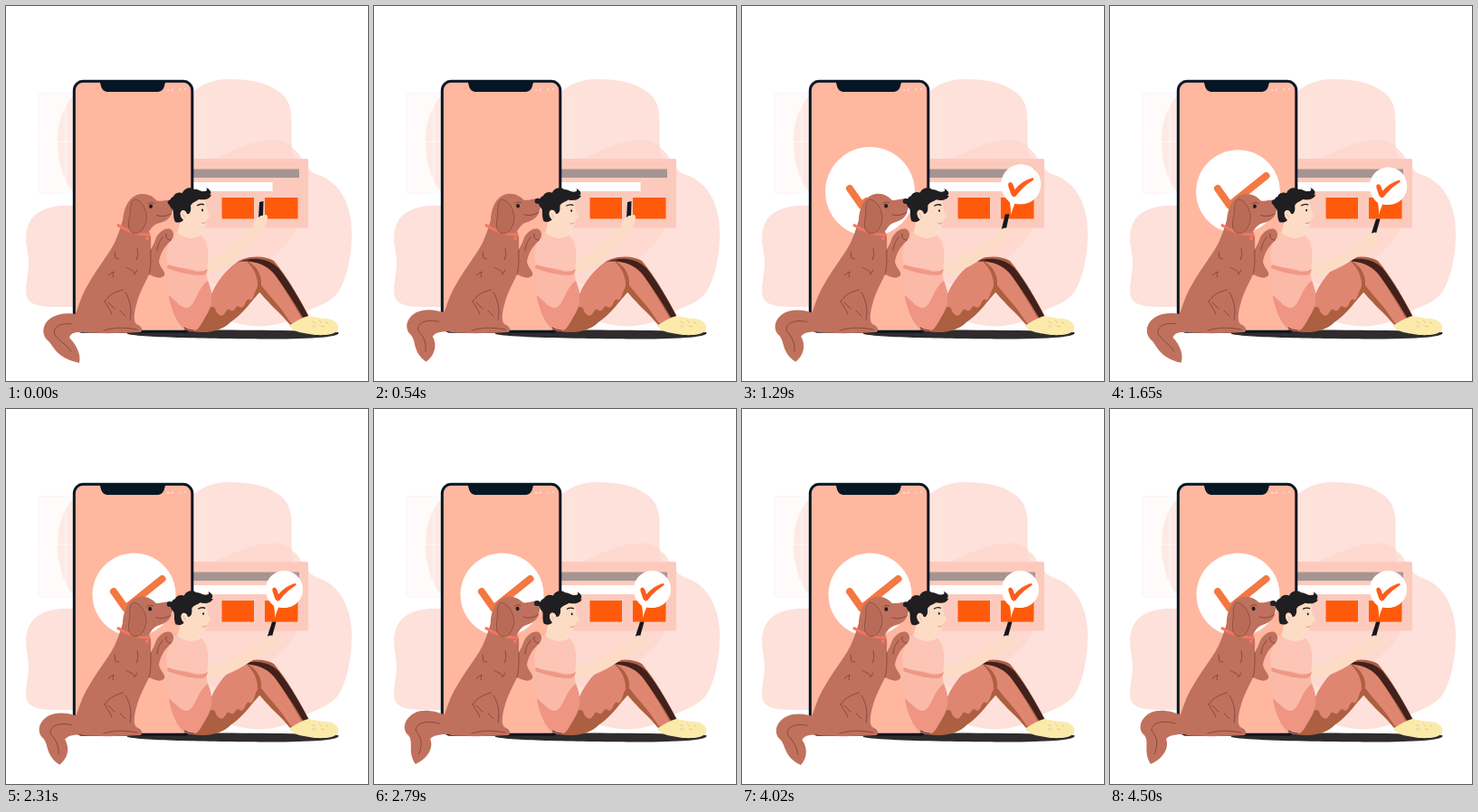
An HTML page that plays this animation: 400 by 415 pixels, repeating every 4530 ms.

```html
<!DOCTYPE html>
<html lang="en">
<head>
<meta charset="utf-8">
<title>Payment confirmed</title>
<style>
  html, body { margin: 0; width: 100%; height: 100%; overflow: hidden; background: #fff; }
  svg { display: block; width: 100vw; height: 100vh; }
  .line { fill: none; stroke: #7d3f33; stroke-width: .8; stroke-linecap: round; }
  .fur { fill: #bf715d; }
  .skin { fill: #fddcc6; }
  .hair { fill: #1f1e20; }
  .tick { fill: none; stroke-linecap: round; stroke-linejoin: round; }
</style>
</head>
<body>
<svg viewBox="0 0 400 415" preserveAspectRatio="none">
  <g id="backdrop">
    <rect x="36" y="96.500" width="188" height="111.500" rx="3" fill="#fefbfa" stroke="#f9f3f1" stroke-width=".7"/>
    <path d="M76 98C63 110 56 130 57 154C58 178 66 198 76 207Z" fill="#fdeae4"/>
    <path d="M36 150H76M66 97V208" stroke="#fff" stroke-width=".8"/>
    <path d="M204 97C216 87 228 81 246 81C272 81 288 85 302 95C314 104 316 116 315.500 132C315 158 316 175 330 210L204 240Z" fill="#fde1da"/>
    <path d="M76 221C50 219 30 226 24 244C19 260 25 270 25 285C25 298 20 312 23 322C28 334 44 333 76 333L150 345L205 215C225 195 242 165 268 154C290 145 311 149 323 163C330 174 333 183 345 187C370 195 382 222 382 250C382 276 378 294 370 312C360 330 342 332 326 341C304 356 274 358 248 349L76 333Z" fill="#fde1da"/>
    <path d="M205 180C228 172 250 158 272 152C292 146 306 148 315 154C317 177 328 190 329 215C329 245 312 265 290 280L240 310L205 300Z" fill="#fdd9d0"/>
    <path d="M206 97H224V169H206Z" fill="#fde5df" opacity=".7"/>
  </g>

  <path d="M134 359C180 358 330 358 367 361C372 366 340 368.500 292 368.500C230 368 150 367 134 363Z" fill="#302c2d"/>

  <g id="card">
    <rect x="200" y="169" width="134" height="76.500" rx="2" fill="#fccabd"/>
    <path d="M200 180.500H324V190H200Z" fill="#a59592"/>
    <path d="M200 195H294.500V205H200Z" fill="#fff"/>
    <path d="M238.500 212H274V235.500H238.500ZM286 212H322.500V235.500H286Z" fill="#ff5a0c"/>
  </g>

  <g id="phone">
    <rect x="75.300" y="83.300" width="130.500" height="277" rx="10" fill="#ffb7a0" stroke="#071624" stroke-width="3"/>
    <path d="M103 82H177C175 85 176 95 167 95H113C104 95 105 85 103 82Z" fill="#071624"/>
    <path d="M178 93h3M184 94v-3M191 94l2-3M197 92h2" stroke="#ffdcd0" stroke-width="1.300"/>
  </g>

  <g id="badge">
    <circle cx="141.500" cy="205.500" r="46" fill="#fff"/>
  </g>
  <path id="mark" class="tick" pathLength="100" stroke-dasharray="100 200" stroke="#f47842" stroke-width="8" d="M119 202L132 220.500L172.500 188"/>

  <g id="bubble">
    <path d="M297 231C297 226 297 223 296 218C290 213 287 207 287 200C287 188 296 179 307.500 179C319 179 328 188 328 199.500C328 211 319 220 308 220C305 220 303 220 301 219.500C300 223 298 227 297 231Z" fill="#fff"/>
    <path d="M295 198C298 196 300 200 301 205C306 199 312 195 319 193C321 193 321 195 319 196C311 201 307 206 302 212C300 213 298 212 297 209C296 205 293 200 295 198Z" fill="#ff5c1c"/>
  </g>

  <path id="tail" class="fur"/>
  <path id="tailLine" class="line"/>

  <g id="legs">
    <path d="M205 359C214 350 221 331 231 311C241 295 251 285 262 280C274 276 288 277 296 282C311 300 324 323 335 344L314 353C304 341 291 327 281 316C272 325 263 340 248 350C238 360 221 363 205 360Z" fill="#ad5f41"/>
    <path d="M224 326C235 299 250 284 266 280C280 279 290 287 296 296C306 310 317 328 327 346L316 352C306 339 292 324 279 309C275 313 274 327 269 325C264 322 265 337 258 333C253 329 254 341 247 336C242 334 243 345 236 342C230 339 233 333 228 333C224 334 222 332 224 326Z" fill="#df8671"/>
    <path d="M256 283C274 277 290 279 301 290C314 306 325 326 334 343L329 346C317 326 306 309 296 296C287 286 274 281 256 283Z" fill="#41211b"/>
    <path d="M264 281C276 286 283 296 282 309C292 322 304 333 313 349C301 340 286 324 278 314C279 301 275 290 264 281Z" fill="#ad5f41"/>
    <path d="M313 354C319 349 327 345 334 343C342 344 348 346 355 346C363 347 369 352 367 358C364 364 353 364.500 341 364C329 362 317 361 313 354Z" fill="#fbeaaa"/>
    <path d="M338 349l4 2m4-3l3 3m4-2l3 3m-18 2l4 1m6-1l4 1" stroke="#e5cf88" stroke-width="1"/>
  </g>

  <g id="arm">
    <path class="skin" d="M208 268C215 271 219 279 225 281C242 273 258 259 272 247C274 241 275 236 279 233C280 229 282 227 284 230L285 233C287 230 289 231 289 235C288 242 285 248 279 252C267 268 249 285 234 293C223 298 214 295 207 291Z"/>
    <path d="M279 234L280 217L284.500 216L284 233Z" fill="#17161a"/>
    <path class="skin" d="M276 240C278 234 281 231 285 232C288 230 290 233 288 237L281 244Z"/>
  </g>

  <g id="torso">
    <path class="skin" d="M193 236L215 238L214 251C217 258 213 264 203 263L188 257Z"/>
    <path d="M188 250C196 258 207 259 216 254C222 261 224 271 223 282C221 290 221 296 223 304C228 318 226 330 219 341C214 349 212 355 207 359C198 361 191 353 187 344C178 323 172 296 176 276C178 264 182 256 188 250Z" fill="#fbb9a7"/>
    <path d="M188 250C196 258 207 259 216 254C222 261 224 271 223 282L222 294L179 287C175 273 179 259 188 250Z" fill="#fdc5b6"/>
    <path d="M179 286C189 290 198 290 207 293C212 295 218 294 223 291C222 295 221 298 216 298C202 298 189 294 178 290Z" fill="#f09885"/>
    <path d="M223 304C229 317 229 331 221 343C216 351 214 358 207 360C198 361 191 353 187 344C184 337 180 327 180 320C189 328 196 337 203 333C211 326 212 312 223 304Z" fill="#ef9583"/>
    <path d="M197 356C201 359 204 359 208 359" fill="none" stroke="#63352c" stroke-width="1.200"/>
  </g>

  <g id="dog">
    <path class="fur" d="M131 230C128 240 125 251 120 262C112 277 99 293 92 306C83 320 81 331 76 343C73 352 77 359 85 361C104 363 128 362 149 361C152 357 149 354 144 352C140 348 142 337 145 327C148 316 154 306 158 297C164 300 171 303 175 298C177 294 170 290 169 283C170 275 175 266 182 260C186 256 186 250 182 247C175 245 170 250 166 256C164 262 162 266 160 269C160 264 161 258 159 251Z"/>
    <path class="line" d="M160 270C160 282 160 290 158 297M182 259C178 259 176 256 177 252M173 256C169 261 167 267 167 271"/>
    <path class="line" d="M133 289C138 293 141 292 142 297L145 292M113 298L119 294L118 300M109 327C114 319 122 316 129 314M109 327C112 333 115 335 117 341M113 328L120 335M132 317C138 327 139 337 137 347M126 337L132 343M120 272L121 279L125 280M145 268C146 273 146 277 144 281M108 359C120 355 133 356 145 358"/>
    <path d="M123 242C133 249 146 253 159 253" fill="none" stroke="#f47661" stroke-width="3"/>
    <circle cx="156" cy="257" r="2" fill="#f47661"/>
  </g>

  <g id="dogHead">
    <path class="fur" d="M129 237C130 222 136 210 148 208C157 207 162 211 166 215C172 216 177 213 182 214C186 217 185 222 183 227C182 234 176 238 168 240C162 242 160 247 157 251C146 253 133 249 129 237Z"/>
    <path d="M141 214C149 214 156 226 155 237C153 246 148 254 140 251C133 247 136 237 137 228C137 222 137 217 141 214Z" fill="#ba6b57" stroke="#8a4a3c" stroke-width=".8"/>
    <path class="line" d="M182 229C177 232 171 233 166 231M163 218C160 217 158 217 156 219"/>
    <ellipse cx="159.500" cy="221.500" rx="2" ry="2.200" fill="#201c22"/>
    <ellipse cx="181.500" cy="216.500" rx="3.400" ry="3" fill="#1c2230"/>
  </g>

  <g id="manHead">
    <path class="skin" d="M192 216C199 209 214 208 219 213C221 218 221 223 222 226C224 229 226 232 225 233.500C223 235 222 235 222 237C221 243 220 246 215 247C209 248 205 245 202 251L192 245Z"/>
    <path class="hair" d="M187 239C184 233 186 228 184 225C181 223 181 219 178 217C182 217 181 212 185 211C187 206 192 206 195 207C197 201 205 200 208 203C212 202 215 206 219 205C222 205 223 203 221 201C226 203 228 207 225 209L227 209C225 214 219 215 213 214C209 217 206 217 204 221C205 227 203 231 200 230C198 224 192 225 193 232C194 235 196 236 196 237C193 240 190 240 187 239Z"/>
    <path class="skin" d="M199 229C197 224 191 226 193 232C194 236 197 238 199 237Z"/>
    <path d="M211 221C214 219 217 219 219 220" fill="none" stroke="#1f1e20" stroke-width="1.300"/>
    <ellipse cx="217" cy="226" rx="1" ry="1.400" fill="#1f1e20"/>
    <path d="M216 240C218 241 220 240 221 239" fill="none" stroke="#e39a85" stroke-width="1"/>
    <path d="M195 230C197 231 196 233 198 234" fill="none" stroke="#e0a78e" stroke-width=".8"/>
  </g>
</svg>

<script>
  const LOOP = 4530, STEP = 30, SWAY = 1800;
  const $ = id => document.getElementById(id);

  // Each pair holds the right and left ends of the wag.
  const tailPoses = [
    'M82 342C70 339 58 340 50 345C41 351 38 362 46 370C53 376 54 389 81 395C83 387 79 376 70 367C72 361 77 361 85 361Z',
    'M82 340C66 333 54 332 45 336C33 342 30 355 38 361C44 369 36 379 45 393C58 387 66 376 62 365C67 360 75 360 85 360Z'
  ];
  const linePoses = [
    'M72 352C60 350 51 356 54 364C58 370 66 374 72 382',
    'M72 348C59 344 45 347 46 356C52 363 54 370 49 382'
  ];
  const popKeys = [[780, 0], [990, .8], [1095, 1.235], [1320, 1.05], [1710, 1]];
  const armKeys = [[750, 0], [990, 6], [1530, 14]];
  const markKeys = [[1080, 0], [1560, 100]];

  const smooth = x => (1 - Math.cos(Math.PI * x)) / 2;
  const linear = x => x;

  function track(keys, t, ease) {
    if (t <= keys[0][0]) return keys[0][1];
    for (let i = 1; i < keys.length; i++) {
      const [t0, a] = keys[i - 1], [t1, b] = keys[i];
      if (t < t1) return a + (b - a) * ease((t - t0) / (t1 - t0));
    }
    return keys[keys.length - 1][1];
  }

  function morph([a, b], k) {
    const to = b.match(/\d+/g);
    let i = 0;
    return a.replace(/\d+/g, n => (+n + (to[i++] - n) * k).toFixed(2));
  }

  const rotate = (id, deg, x, y) =>
    $(id).setAttribute('transform', `rotate(${deg} ${x} ${y})`);

  const scale = (id, s, x, y) =>
    $(id).setAttribute('transform', `translate(${x} ${y}) scale(${s}) translate(${-x} ${-y})`);

  function draw(t) {
    const sway = smooth(2 * t / SWAY);
    $('tail').setAttribute('d', morph(tailPoses, sway));
    $('tailLine').setAttribute('d', morph(linePoses, sway));
    rotate('manHead', 4 * sway, 205, 251);
    rotate('dogHead', 1.5 - 4 * sway, 148, 243);

    rotate('arm', track(armKeys, t, linear), 212, 283);

    const pop = track(popKeys, t, linear);
    scale('badge', pop, 141.5, 205.5);
    scale('bubble', pop, 297, 229);

    const drawn = track(markKeys, t, smooth);
    $('mark').setAttribute('stroke-dashoffset', 100 - drawn);
    $('mark').style.display = drawn > 0 ? '' : 'none';
  }

  const start = performance.now();
  function tick() {
    const t = (performance.now() - start) % LOOP;
    draw(Math.floor(t / STEP) * STEP);
    requestAnimationFrame(tick);
  }
  tick();
</script>
</body>
</html>
```
